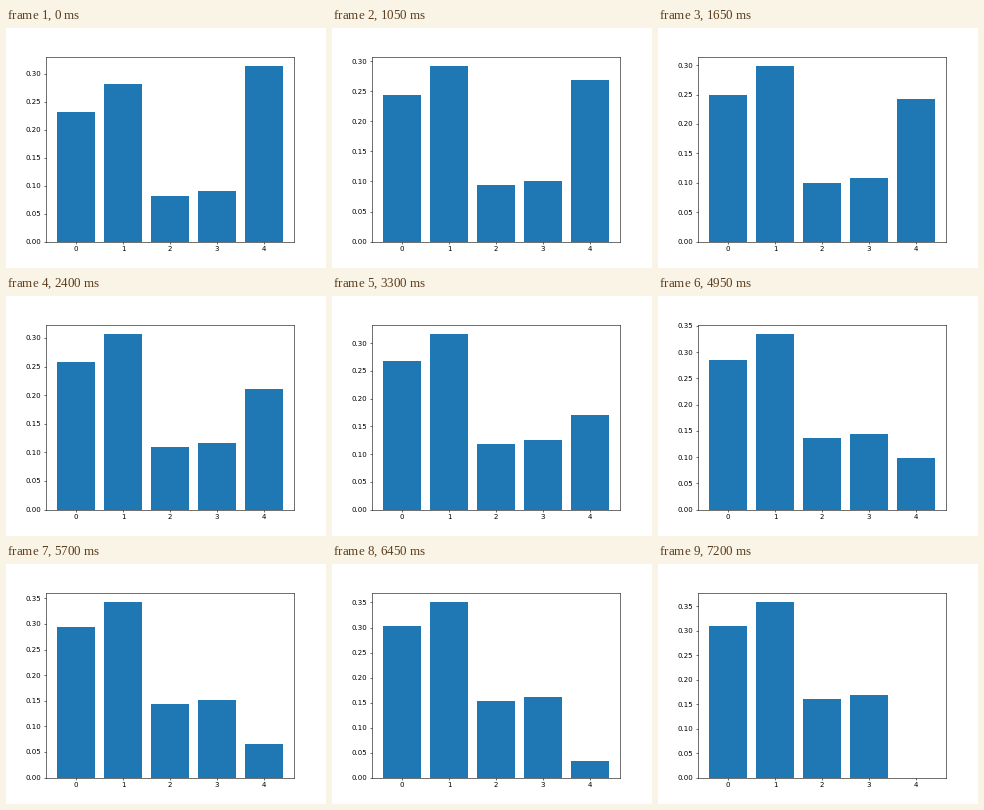
A matplotlib script that plays this animation: 320x240 px, repeating every 8 s.

```python
import numpy as np
import matplotlib.pyplot as plt
from matplotlib.animation import FuncAnimation

TICK = 50          # ms per frame
LOOP = 8000        # ms
STEP_MS = 150      # the bars move once per step
STEPS = 48         # steps until the last bar is empty

FINAL = np.array([0.3104, 0.36, 0.161, 0.1686, 0.0])
SHARE = 0.315 * np.array([-0.25, -0.25, -0.25, -0.25, 1.0])


def heights(step):
    """The last bar drains at a steady rate, evenly into the other four."""
    return FINAL + SHARE * (1 - step / STEPS)


fig, ax = plt.subplots(figsize=(6.4, 4.8), dpi=50)
bars = ax.bar(range(5), heights(0), color="#1f77b4")


def draw(frame):
    step = min(frame * TICK // STEP_MS, STEPS)
    values = heights(step)
    for bar, value in zip(bars, values):
        bar.set_height(value)
    ax.set_ylim(0, 1.05 * values.max())
    return bars


anim = FuncAnimation(fig, draw, frames=LOOP // TICK, interval=TICK,
                     init_func=lambda: draw(0), repeat=True, repeat_delay=0)
plt.show()
```
